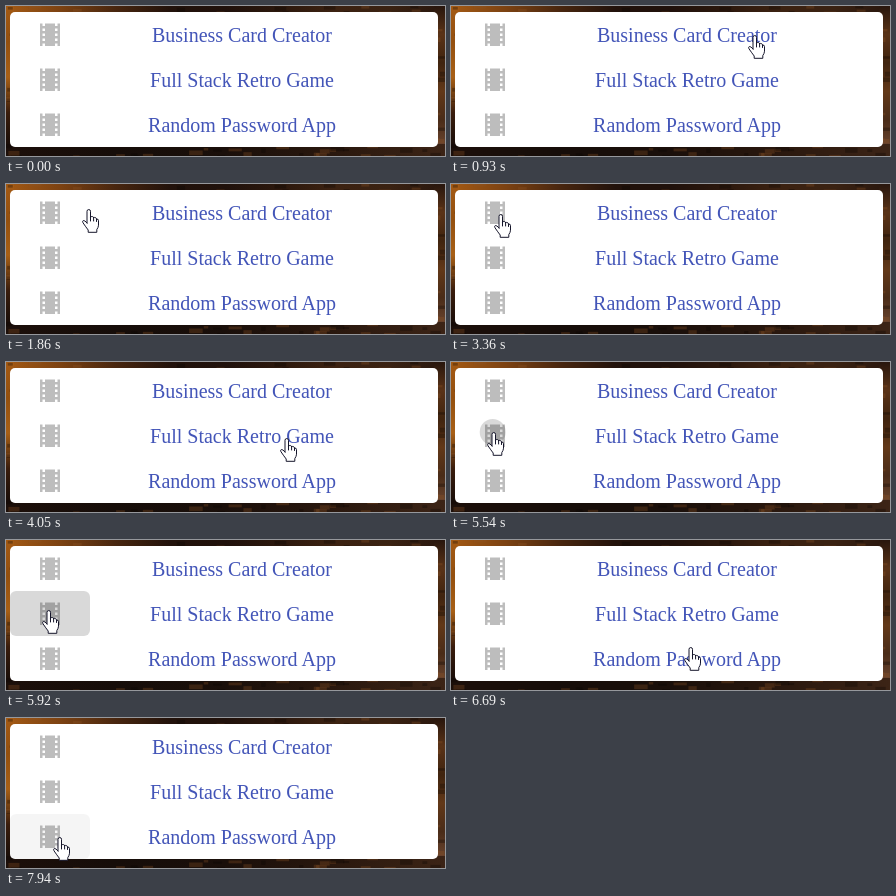
Write an HTML page that moves like this. It is 439 px wide and 150 px high and loops after 8 s.

```html
<!DOCTYPE html>
<html lang="en">
<head>
<meta charset="utf-8">
<title>Project list</title>
<style>
  html, body { margin: 0; width: 100%; height: 100%; overflow: hidden; background: #140b08; }
  svg { display: block; }
  text { font: 20px "Liberation Serif", "Times New Roman", serif; fill: #4355b8; text-anchor: middle; }
</style>
</head>
<body>
<svg width="439" height="150" viewBox="0 0 439 150">
  <defs>
    <path id="film" d="M18 3v2h-2V3H8v2H6V3H4v18h2v-2h2v2h8v-2h2v2h2V3h-2zM8 17H6v-2h2v2zm0-4H6v-2h2v2zm0-4H6V7h2v2zm10 8h-2v-2h2v2zm0-4h-2v-2h2v2zm0-4h-2V7h2v2z"/>
    <clipPath id="button"><rect x="4" y="6" width="80" height="45" rx="6"/></clipPath>
  </defs>
  <g id="wall"></g>
  <rect x="4" y="6" width="428" height="135" rx="5" fill="#fff"/>
  <g id="rows"></g>
  <g id="hand" stroke="#15152a" stroke-linejoin="round" stroke-linecap="round">
    <path fill="#fff" d="M5 14V2.3a1.75 1.75 0 0 1 3.5 0V8.4Q9 7.3 10.3 7.5Q11.6 7.7 11.7 9Q12.2 8.2 13.3 8.5Q14.5 8.9 14.5 10.2Q16.5 9.6 16.5 11.7V16.2Q16.4 18.4 14.8 20.6V23.3H6.2V21Q4 18.2 1 13.8Q0 12.2 1.2 11.6Q2.6 10.9 5 14Z"/>
    <path fill="none" d="M8.5 8.4V12M11.6 9V12M14.5 10.2V12.5"/>
  </g>
</svg>
<script>
const LOOP = 8000, TICK = 77, ROW = 45, FINGERTIP = 5.7;
const titles = ["Business Card Creator", "Full Stack Retro Game", "Random Password App"];

// The pointer goes from stop to stop; snap hurries the middle, lift bows the path upwards.
const entry = [382, 146];
const moves = [
  { at: 230, steps: 3, to: [407, 11], snap: 2, lift: 0 },
  { at: 700, steps: 6, to: [269, 34], snap: 1, lift: 0 },
  { at: 1550, steps: 10, to: [33, 28], snap: 4.5, lift: 4 },
  { at: 3360, steps: 10, to: [274, 76], snap: 3.5, lift: 0 },
  { at: 4610, steps: 10, to: [36, 70], snap: 2.1, lift: 3 },
  { at: 6310, steps: 10, to: [245, 115], snap: 7, lift: 6 },
  { at: 7390, steps: 8, to: [47, 119], snap: 3, lift: 0 }
];
const clicks = [{ at: 2820, lasts: 230, row: 0 }, { at: 5540, lasts: 520, row: 1 }];

const $ = id => document.getElementById(id);
const clamp = v => Math.max(0, Math.min(1, v));
const mix = (a, b, k) => a + (b - a) * k;

function strip(id, x, y, width, height, colours) {
  const upright = height > width;
  const stops = colours.map((c, i) => `<stop offset="${i / (colours.length - 1)}" stop-color="${c}"/>`);
  return `<linearGradient id="${id}" x2="${+!upright}" y2="${+upright}">${stops.join("")}</linearGradient>
    <rect x="${x}" y="${y}" width="${width}" height="${height}" fill="url(#${id})"/>`;
}

function bricks(count) {
  let seed = 7;
  const random = () => (seed = seed * 16807 % 2147483647) / 2147483647;
  return Array.from({ length: count }, () => {
    const x = random() * 439, y = random() * 150;
    const fill = random() < .5 ? "#080403" : "#8a5426";
    return `<rect x="${x}" y="${y}" width="${4 + random() * 10}" height="${2 + random() * 3}" fill="${fill}" opacity=".3"/>`;
  }).join("");
}

$("wall").innerHTML =
  strip("top", 0, 0, 439, 8, ["#a45a14", "#7c4212", "#48260f", "#22120b", "#20110b", "#2c180d", "#3c2211", "#3a2212", "#28160d"]) +
  strip("left", 0, 0, 8, 142, ["#a45a14", "#94500f", "#a86016", "#3a1d0d", "#160c08"]) +
  strip("right", 428, 0, 11, 142, ["#28160d", "#5a3317", "#40240f", "#623818", "#4a2c18", "#6c4630"]) +
  strip("bottom", 0, 138, 439, 12, ["#1c0f0a", "#160d09", "#1a0f0a", "#2a180e", "#3c2416"]) +
  bricks(400);

$("rows").innerHTML = titles.map((title, i) => `
  <g transform="translate(0 ${ROW * i})">
    <use href="#film" transform="translate(29 13.75) scale(1.25)" fill-opacity=".26"/>
    <g clip-path="url(#button)">
      <rect class="hover" x="4" y="6" width="80" height="45" fill-opacity="0"/>
      <circle class="ripple" r="0" fill-opacity=".15"/>
    </g>
    <text x="236" y="35.5">${title}</text>
  </g>`).join("");

const hovers = document.querySelectorAll(".hover");
const ripples = document.querySelectorAll(".ripple");

function pointerAt(t) {
  const index = moves.findLastIndex(m => m.at <= t);
  if (index < 0) return null;
  const { at, steps, to, snap, lift } = moves[index];
  const from = index ? moves[index - 1].to : entry;
  const p = clamp((Math.floor((t - at + 10) / TICK) + 1) / steps);
  const rise = snap * p * p;
  const k = rise / (rise + (1 - p) ** 2);
  return [mix(from[0], to[0], k), mix(from[1], to[1], k) - lift * Math.sin(Math.PI * p)].map(Math.round);
}

function draw(t) {
  const pos = pointerAt(t);
  $("hand").style.display = pos ? "" : "none";
  if (pos) $("hand").setAttribute("transform", `translate(${pos})`);
  for (const { at, lasts, row } of clicks) {
    const age = t - at, ripple = ripples[row];
    const active = age >= 0 && age < lasts;
    ripple.setAttribute("r", active ? 13 + 10 * Math.floor((age + 10) / TICK) : 0);
    if (active) {
      ripple.setAttribute("cx", pos[0] + FINGERTIP);
      ripple.setAttribute("cy", pos[1] - ROW * row);
    }
  }
  hovers[2].setAttribute("fill-opacity", .04 * clamp((t - 7700) / 200));
}

const begin = performance.now();
function frame() {
  draw((performance.now() - begin) % LOOP);
  requestAnimationFrame(frame);
}
frame();
</script>
</body>
</html>
```
